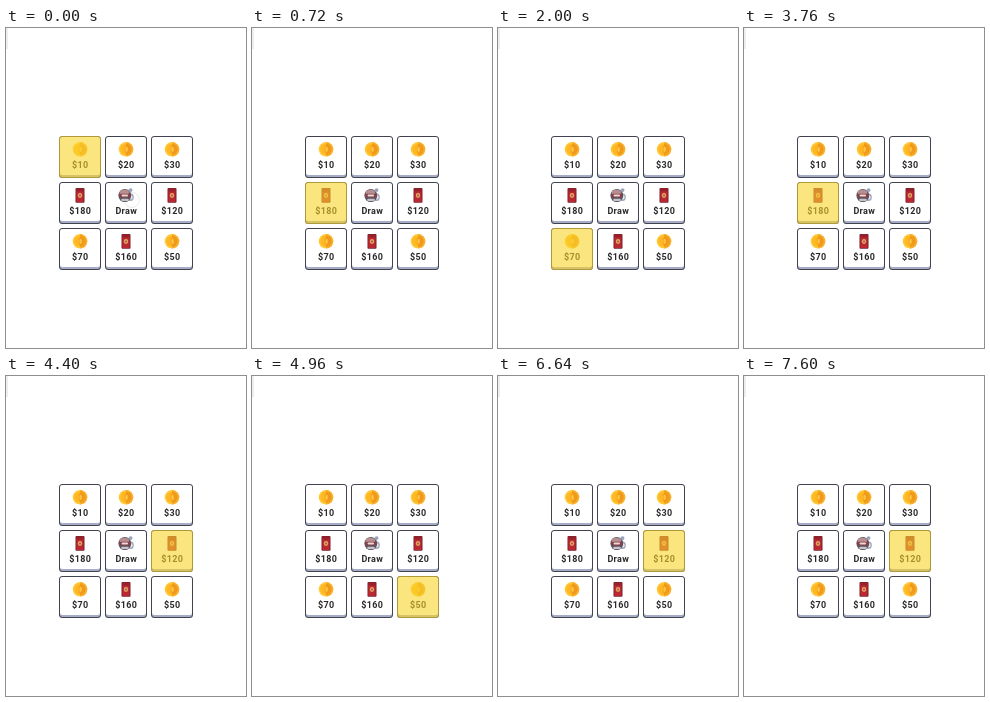
An HTML page with a canvas that plays this animation: 240 px wide and 320 px high, repeating every 7.92 s.

```html
<!DOCTYPE html>
<html lang="en">
<head>
<meta charset="utf-8">
<title>Prize grid</title>
<style>
  html, body { margin: 0; width: 100%; height: 100%; overflow: hidden; background: #fff; }
  canvas { display: block; width: 240px; height: 320px; }
</style>
</head>
<body>
<canvas id="stage"></canvas>
<script>
const LOOP = 7920;
const LEFT = 53, TOP = 108, PITCH = 46, SIZE = 42;

// Clockwise from the top left: column, row, prize, icon
const cells = [
  [0, 0, '$10', coin], [1, 0, '$20', coin], [2, 0, '$30', coin],
  [2, 1, '$120', packet], [2, 2, '$50', coin], [1, 2, '$160', packet],
  [0, 2, '$70', coin], [0, 1, '$180', packet]
];

// Each spin slows down towards its prize
const spins = [
  { start: 200, end: 1960, moves: 30, power: 2 },
  { start: 3715, end: 5760, moves: 29, power: 1.6 }
];

const canvas = document.getElementById('stage');
const ctx = canvas.getContext('2d');
const ratio = window.devicePixelRatio || 1;
canvas.width = 240 * ratio;
canvas.height = 320 * ratio;

function activeCell(t) {
  let moves = 0;
  for (const s of spins) {
    const u = Math.min(1, Math.max(0, (t - s.start) / (s.end - s.start)));
    moves += Math.floor(s.moves * (1 - Math.pow(1 - u, s.power)));
  }
  return moves % cells.length;
}

function box(x, y, w, h, r, fill) {
  ctx.beginPath();
  ctx.roundRect(x, y, w, h, r);
  ctx.fillStyle = fill;
  ctx.fill();
}

function disc(x, y, rx, ry, fill, from = 0, to = Math.PI * 2) {
  ctx.beginPath();
  ctx.ellipse(x, y, rx, ry, 0, from, to);
  ctx.fillStyle = fill;
  ctx.fill();
}

function label(text, x, y) {
  ctx.font = '600 9px Roboto, sans-serif';
  ctx.letterSpacing = '0.35px';
  ctx.textAlign = 'center';
  ctx.textBaseline = 'alphabetic';
  ctx.fillStyle = '#2b2b2d';
  ctx.fillText(text, x, y);
}

// Light left half, shaded right half
function coin(x, y) {
  const half = Math.PI / 2;
  disc(x, y, 7.3, 7.3, '#ffc93c');
  disc(x, y, 5.7, 5.7, '#ffb822');
  disc(x, y, 7.3, 7.3, '#f9b02c', -half, half);
  disc(x, y, 5.7, 5.7, '#f09a1c', -half, half);
  box(x - 1.2, y - 3.6, 2.2, 7.2, 1, '#f3a01e');
  box(x - 0.5, y - 2.4, 2.2, 4.8, 1, '#ffc642');
}

function packet(x, y) {
  box(x - 4.5, y - 7.3, 9, 14.8, 1, '#74202a');
  box(x - 3.7, y - 6.6, 7.2, 13.2, 0.6, '#bb2832');
  box(x - 3.7, y - 6.6, 7.2, 2.8, 0.6, '#98202b');
  disc(x, y + 0.2, 2.2, 2.4, '#e0a765');
  disc(x, y + 0.2, 0.9, 1, '#b9463a');
}

function drawIcon(x, y) {
  disc(x + 4.8, y + 2, 3, 3.7, '#9fa6b8');
  disc(x + 4.8, y + 2, 1.8, 2.3, '#e4e8f0');
  disc(x - 1.2, y + 0.2, 6.4, 6.6, '#5c5560');
  disc(x - 1.6, y - 2.6, 4.8, 3, '#b88f90');
  box(x - 6.6, y - 1.6, 11, 3.6, 1.5, '#8f3d45');
  box(x - 4.4, y - 0.8, 6.4, 2, 0.8, '#ead9d6');
  box(x - 4.8, y + 3.4, 7.6, 2.4, 1.1, '#c8c2ca');
  disc(x + 4.6, y - 5.2, 1.9, 1.9, '#98a2ba');
}

function cell(col, row, text, icon, lit) {
  const x = LEFT + col * PITCH, y = TOP + row * PITCH;
  const mid = x + SIZE / 2;
  box(x, y, SIZE, SIZE, 3.5, '#41434f');
  box(x + 1, y + 1, SIZE - 2, SIZE - 2, 2.5, '#a6abc6');
  box(x + 1, y + 1, SIZE - 2, SIZE - 4, 2.5, '#fff');
  icon(mid, y + 13.3);
  label(text, mid + 0.3, y + 32.3);
  if (lit) box(x, y, SIZE, SIZE, 3.5, 'rgba(249, 212, 40, 0.6)');
}

function touchRing() {
  ctx.beginPath();
  ctx.arc(126, 172, 7.5, 0, Math.PI * 2);
  ctx.lineWidth = 0.8;
  ctx.strokeStyle = 'rgba(120, 120, 130, 0.2)';
  ctx.stroke();
}

function render(t) {
  ctx.setTransform(ratio, 0, 0, ratio, 0, 0);
  ctx.fillStyle = '#fff';
  ctx.fillRect(0, 0, 240, 320);
  ctx.fillStyle = '#eee';
  ctx.fillRect(0, 0, 2, 21);
  const active = activeCell(t);
  cells.forEach(([col, row, text, icon], i) => cell(col, row, text, icon, i === active));
  cell(1, 1, 'Draw', drawIcon, false);
  if (t < 80) touchRing();
}

const begin = performance.now();
function tick() {
  render((performance.now() - begin) % LOOP);
  requestAnimationFrame(tick);
}
tick();
</script>
</body>
</html>
```
